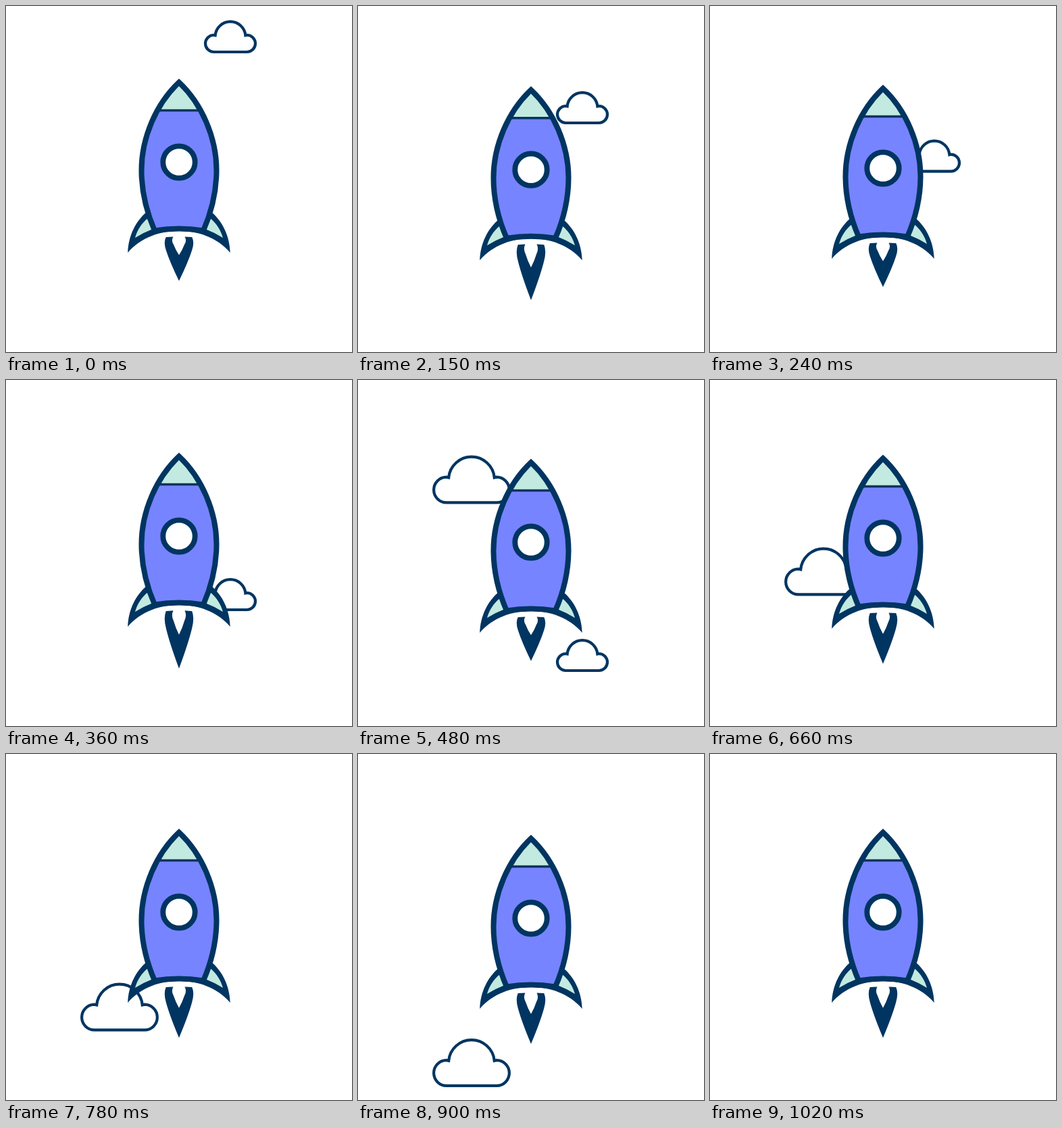
Recreate the animation shown at these times as an HTML page. Size 512 by 512 pixels, loop 1050 ms.

```html
<!DOCTYPE html>
<html lang="en">
<head>
<meta charset="utf-8">
<title>Rocket</title>
<style>
  html, body { margin: 0; width: 100%; height: 100%; overflow: hidden; background: #fff; }
  svg { display: block; width: 100vw; height: 100vh; }
  .line { stroke: #013561; }
  .navy { fill: #013561; }
  .mint { fill: #c3eae0; }
</style>
</head>
<body>
<svg viewBox="0 0 512 512">
  <defs>
    <path id="puff" class="line" fill="#fff" stroke-width="4.2" vector-effect="non-scaling-stroke"
      d="M-24.5 45A12.5 12.5 0 0 1-24.5 20L-22.4 20.5A22.5 22.5 0 0 1 22.4 20.5L24.5 20A12.5 12.5 0 0 1 24.5 45Z"/>
    <path id="finFill" class="mint" d="M210 314C201 321 194 332 191 343Q204 335 217 330Z"/>
    <path id="hull" d="M256 113C222 145 200.5 195 200.5 243C200.5 276 208 305 220 332.5Q256 326.5 292 332.5C304 305 311.5 276 311.5 243C311.5 195 290 145 256 113Z"/>
    <clipPath id="hullClip"><use href="#hull"/></clipPath>
  </defs>
  <use id="smallCloud" href="#puff"/>
  <use id="bigCloud" href="#puff"/>
  <g id="rocket">
    <path id="flame" class="navy"
      d="M236.7 342L247.5 341.5Q244 347 248 353Q251 361 256 368.5Q261 361 264 353Q268 347 264.5 341.5L275.3 342Q279.3 350 275 362Q269.5 379 256 406.8Q242.5 379 237 362Q232.7 350 236.7 342Z"/>
    <path class="navy" d="M209 304C192 318 181 340 180.3 365C200 342 228 333 256 333C284 333 312 342 331.7 365C331 340 320 318 303 304Z"/>
    <use href="#finFill"/>
    <use href="#finFill" transform="matrix(-1 0 0 1 512 0)"/>
    <use href="#hull" fill="#7784ff"/>
    <g clip-path="url(#hullClip)">
      <path class="mint" d="M190 100H322V154.5H190Z"/>
      <path class="line" stroke-width="3.5" d="M190 154.5H322"/>
    </g>
    <use href="#hull" class="line" fill="none" stroke-width="8"/>
    <circle class="line" cx="256" cy="231" r="23.7" fill="#fff" stroke-width="7.8"/>
  </g>
</svg>
<script>
  const STEP = 30, STEPS = 35;
  const get = id => document.getElementById(id);

  // Each cloud: centre x, scale, and [step, top] points along its fall.
  const clouds = [
    { el: get('smallCloud'), x: 332, scale: 1, path: [[0, 23], [5, 128], [12, 295], [16, 385], [18, 430]] },
    { el: get('bigCloud'), x: 168, scale: 1.51, path: [[13, 46], [16, 113.5], [22, 249.5], [26, 340.5], [30, 423]] }
  ];

  const wave = (step, period) => (1 - Math.cos(2 * Math.PI * step / period)) / 2;

  function along(path, step) {
    const i = Math.max(1, path.findIndex(p => p[0] >= step));
    const [a, from] = path[i - 1], [b, to] = path[i];
    return from + (to - from) * (step - a) / (b - a);
  }

  function draw(step) {
    get('rocket').setAttribute('transform', `translate(0 ${12 * wave(step, 12)})`);
    const stretch = 1 + 20 / 64 * wave(step, 8);
    get('flame').setAttribute('transform', `translate(0 342) scale(1 ${stretch}) translate(0 -342)`);
    for (const { el, x, scale, path } of clouds) {
      const visible = step >= path[0][0] && step <= path[path.length - 1][0];
      el.setAttribute('visibility', visible ? 'visible' : 'hidden');
      if (visible) el.setAttribute('transform', `translate(${x} ${along(path, step)}) scale(${scale})`);
    }
  }

  const start = performance.now();
  function tick() {
    draw(Math.floor((performance.now() - start) / STEP) % STEPS);
    requestAnimationFrame(tick);
  }
  tick();
</script>
</body>
</html>
```
